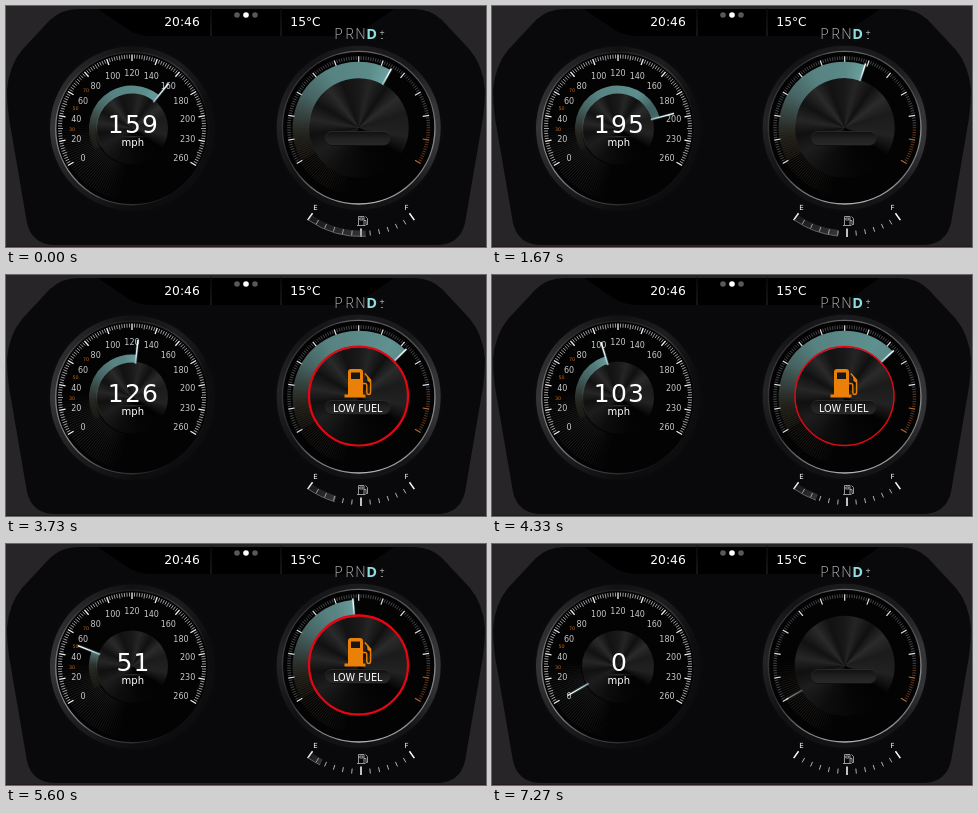
Write an HTML page with a canvas that moves like this. It is 480 by 241 pixels and loops after 7.34 s.

```html
<!DOCTYPE html>
<html lang="en">
<head>
<meta charset="utf-8">
<title>Instrument cluster</title>
<style>
html, body { margin: 0; width: 100%; height: 100%; overflow: hidden; background: #272527; }
canvas { display: block; width: 480px; height: 241px; }
</style>
</head>
<body>
<canvas id="stage"></canvas>
<script>
const W = 480, H = 241, LOOP = 7340, STEP = 200 / 3;
const SANS = '"DejaVu Sans", sans-serif';
const LIGHT = '"Open Sans", "Noto Sans", sans-serif';
const canvas = document.getElementById('stage');
const scale = window.devicePixelRatio || 1;
const base = document.createElement('canvas');
for (const c of [canvas, base]) { c.width = W * scale; c.height = H * scale; }
const screen2d = canvas.getContext('2d');
let g = base.getContext('2d');
g.scale(scale, scale);
screen2d.scale(scale, scale);

const speedo = { x: 126, y: 122.5 };
const tacho = { x: 352.7, y: 121.7 };
const fuel = { x: 355, y: 138 };

// [time in ms, value]
const speedKeys = [[0, 159], [1670, 195], [1950, 201], [2930, 160], [3730, 126],
  [4930, 80], [5600, 51], [6400, 18], [6850, 4], [7250, 0]];
const tachoKeys = [[0, 29], [1670, 18], [1950, 18], [2930, 30], [3730, 45],
  [4300, 47], [4930, 41], [5250, 22], [5600, -5], [6900, -112], [7200, -120]];
const fuelKeys = [[0, 3], [7270, -35]];

function valueAt(keys, t) {
  const i = keys.findIndex(k => k[0] > t);
  if (i < 0) return keys[keys.length - 1][1];
  const [t0, a] = keys[i - 1], [t1, b] = keys[i];
  return a + (b - a) * (t - t0) / (t1 - t0);
}

// Angles are in degrees, clockwise from straight up.
const rad = a => (a - 90) * Math.PI / 180;
const polar = (c, r, a) => [c.x + r * Math.cos(rad(a)), c.y + r * Math.sin(rad(a))];

function conic(c, from, stops) {
  const grad = g.createConicGradient(rad(from), c.x, c.y);
  stops.forEach(([deg, color]) => grad.addColorStop(deg / 360, color));
  return grad;
}
function linear(x0, y0, x1, y1, ...colors) {
  const grad = g.createLinearGradient(x0, y0, x1, y1);
  colors.forEach((color, i) => grad.addColorStop(i / (colors.length - 1), color));
  return grad;
}
function radial(c, r0, r1, ...colors) {
  const grad = g.createRadialGradient(c.x, c.y, r0, c.x, c.y, r1);
  colors.forEach((color, i) => grad.addColorStop(i / (colors.length - 1), color));
  return grad;
}
function disc(c, r, fill) {
  g.fillStyle = fill;
  g.beginPath();
  g.arc(c.x, c.y, r, 0, 2 * Math.PI);
  g.fill();
}
function arc(c, r, from, to, width, color) {
  g.strokeStyle = color;
  g.lineWidth = width;
  g.beginPath();
  g.arc(c.x, c.y, r, rad(from), rad(to));
  g.stroke();
}
function spoke(c, r0, r1, a, width, color) {
  g.strokeStyle = color;
  g.lineWidth = width;
  g.beginPath();
  g.moveTo(...polar(c, r0, a));
  g.lineTo(...polar(c, r1, a));
  g.stroke();
}
function text(str, x, y, size, color = '#fff', family = SANS, weight = 400) {
  g.font = `${weight} ${size}px ${family}`;
  g.textAlign = 'center';
  g.textBaseline = 'alphabetic';
  g.fillStyle = color;
  g.fillText(str, x, y);
}
function shape(d, fill, stroke, width = 1) {
  const path = new Path2D(d);
  if (fill) { g.fillStyle = fill; g.fill(path); }
  if (stroke) { g.strokeStyle = stroke; g.lineWidth = width; g.stroke(path); }
}

function drawPanel() {
  g.fillStyle = '#272527';
  g.fillRect(0, 0, W, H);
  shape('M72 3H408Q424 3 436 14L464 44Q477 60 479 84Q479 98 477 112L459 217Q454 239 430 239H50Q26 239 21 217L3 112Q1 98 1 84Q3 60 16 44L44 14Q56 3 72 3Z', '#09080b');
  g.fillStyle = '#25191d';
  g.fillRect(0, 240, W, 1);

  shape('M92 3L120 22Q131 30 146 30H334Q349 30 360 22L388 3Z', '#000');
  g.fillStyle = linear(0, 0, 0, 30, '#0c0c0e', '#2d2d30');
  g.fillRect(204.5, 2, 1, 28);
  g.fillRect(274.5, 2, 1, 28);
  [231, 240, 249].forEach(x => disc({ x, y: 9 }, 2.8, x === 240 ? '#fff' : '#58585a'));
  text('20:46', 176, 20, 12.3);
  text('15°C', 299.5, 20, 12.3);

  g.fontStretch = 'condensed';
  [...'PRN'].forEach((ch, i) => text(ch, 332.5 + i * 11, 33, 14.5, '#b2b5b7', LIGHT, 300));
  text('D', 365.5, 33, 14.5, '#8fdede', LIGHT, 700);
  g.fontStretch = 'normal';
  text('+', 376, 30, 9, '#c4c4c4', LIGHT);
  text('-', 376, 34.5, 9, '#c4c4c4', LIGHT);
}

function drawBezel(c, band, rim) {
  disc(c, 87, radial(c, 76, 87, 'rgba(22,22,24,.8)', 'rgba(9,8,11,0)'));
  arc(c, 79, 0, 360, 6, conic(c, 0, band));
  disc(c, 76, '#030304');
  arc(c, 76.3, 0, 360, 1.4, conic(c, 0, rim));
}

// Fine rays fading out below the start of the scale.
function drawRays(c, inner, outer, tint) {
  for (let a = -172; a <= -84; a += 2) {
    const alpha = .38 * Math.sin((a + 172) / 88 * Math.PI);
    spoke(c, inner, outer, a, .8, `rgba(${tint},${alpha})`);
  }
}

function drawHub(c, r) {
  disc(c, r, conic(c, 0, [[0, '#19191a'], [14, '#252526'], [34, '#101011'], [52, '#2b2b2c'], [72, '#1b1b1c'],
    [100, '#222223'], [118, '#0b0b0c'], [124, '#020203'], [165, '#050506'], [205, '#0d0d0e'], [240, '#1d1d1e'],
    [262, '#101011'], [280, '#262627'], [300, '#111112'], [322, '#2a2a2b'], [340, '#121213'], [360, '#19191a']]));
}

function drawDials() {
  drawBezel(speedo,
    [[0, '#111113'], [35, '#1d1d1f'], [70, '#0d0d0f'], [180, '#0d0d0f'], [225, '#1d1d1f'], [270, '#353537'], [310, '#29292b'], [360, '#111113']],
    [[0, '#1c1c1e'], [40, '#3c3c3e'], [75, '#111113'], [150, '#0f0f11'], [200, '#424244'], [235, '#87878a'], [285, '#6e6e70'], [320, '#303032'], [360, '#1c1c1e']]);
  drawRays(speedo, 37, 72, '92,90,86');
  for (let a = -120; a <= 120; a += 2) {
    const major = a % 20 === 0, mid = a % 10 === 0;
    spoke(speedo, major ? 67.5 : mid ? 69 : 70, 74, a, major ? 1.3 : .8, major ? '#f4f4f4' : '#c4c4c4');
  }
  const labels = [0, 20, 40, 60, 80, 100, 120, 140, 160, 180, 200, 230, 260];
  labels.forEach((n, i) => {
    const [x, y] = polar(speedo, 56.5, i * 20 - 120);
    text(n, x, y + 3.8, 8, '#c9c9c9');
  });
  [30, 50, 70].forEach(n => {
    const [x, y] = polar(speedo, 60, n - 120);
    text(n, x, y + 2, 4.8, '#c06a1a');
  });
  drawHub(speedo, 36);

  drawBezel(tacho,
    [[0, '#1b1b1d'], [40, '#19191b'], [75, '#343436'], [105, '#343436'], [140, '#151517'], [230, '#111113'], [275, '#242426'], [320, '#141416'], [360, '#1b1b1d']],
    [[0, '#69696b'], [30, '#58585a'], [60, '#4a4a4c'], [95, '#88888a'], [130, '#7c7c7e'], [170, '#bababc'], [205, '#868688'], [245, '#2b2b2d'], [285, '#3b3b3d'], [325, '#2e2e30'], [360, '#69696b']]);
  drawRays(tacho, 50, 68, '96,84,64');
  for (let a = -120; a <= 120; a += 2) {
    const major = a % 20 === 0, hot = a >= 90;
    spoke(tacho, major ? 65 : 68, 71.5, a, major ? 1.2 : .8,
      hot ? (major ? '#b56a35' : '#7a4322') : (major ? '#e4e4e4' : '#565a5c'));
  }
  drawHub(tacho, 50);
}

function drawFuelScale() {
  for (let i = -6; i <= 6; i++) {
    const long = i % 6 === 0;
    spoke(fuel, long ? 84.5 : 87, long ? 93 : 92, 180 - i * 35 / 6, long ? 1.5 : 1, long ? '#fff' : '#b0b0b0');
  }
  text('E', 309.5, 204, 7);
  text('F', 400.5, 204, 7);
  shape('M352.5 219.5V210.5H358V219.5M351 219.5H359.5M353.8 212H356.8V214H353.8ZM358 214.5H360V218.5H361.5V212.5L359.5 210.5', null, '#b9b9b9', .8);
}

function drawSweep(c, inner, outer, angle) {
  if (angle < -119.8) return;
  const mid = (inner + outer) / 2, width = outer - inner;
  const clear = 'rgba(70,62,43,0)';
  arc(c, mid, -120, angle, width, conic(c, -120, [[0, 'rgba(80,70,48,.12)'], [20, 'rgba(88,84,65,.3)'],
    [38, 'rgba(88,106,99,.55)'], [62, 'rgba(86,124,122,.8)'], [90, '#578281'], [150, '#5d908e'],
    [172, '#46696a'], [200, '#283b3c'], [240, '#243536'], [360, clear]]));
  const tail = Math.min(18, angle + 120);
  arc(c, mid, angle - tail, angle, width,
    conic(c, angle - tail, [[0, 'rgba(150,210,210,0)'], [tail, 'rgba(150,210,210,.25)'], [360, clear]]));
}

function drawNeedle(c, inner, outer, angle, alpha = 1) {
  g.globalAlpha = alpha;
  spoke(c, inner, outer, angle, 3, 'rgba(150,210,220,.22)');
  const [x0, y0] = polar(c, inner, angle), [x1, y1] = polar(c, outer, angle);
  spoke(c, inner, outer, angle, 1.4, linear(x0, y0, x1, y1, '#8fb2b8', '#e4f2f4', '#fff'));
  g.globalAlpha = 1;
}

function drawPill() {
  g.beginPath();
  g.roundRect(319, 125.5, 65.5, 14, 7);
  g.fillStyle = linear(0, 125, 0, 140, '#0f0f10', '#212122', '#2a2a2b');
  g.fill();
  g.strokeStyle = linear(0, 125, 0, 140, '#2f2f30', '#1a1a1b', '#0c0c0d');
  g.lineWidth = .8;
  g.stroke();
}

function drawWarning(t) {
  const pulse = (1 - Math.cos((t - 4900) / 480 * 2 * Math.PI)) / 2;
  arc({ x: 352.5, y: 121 }, 49.5, 0, 360, 1.1 + 1.2 * pulse, '#e40613');
  const orange = '#ea8008';
  shape('M342 119.5V97Q342 94 345 94H354Q357 94 357 97V119.5ZM338.5 119.5H359.5V122.5H338.5Z', orange);
  shape('M345 97.5H354V104H345Z', '#171718');
  shape('M357 108.5H359Q360.8 108.5 360.8 110.5V117Q360.8 119.5 362.6 119.5Q364.6 119.5 364.6 117V105L358.8 98.5', null, orange, 1.4);
  shape('M361 101L364.6 104.5V108L361.5 106Z', orange);
  text('LOW FUEL', 351.7, 136.7, 9.7);
}

function drawFuelLevel(angle) {
  const end = 180 - angle;
  if (end >= 215) return;
  arc(fuel, 89.5, end, 215, 6, conic(fuel, end, [[0, 'rgba(130,130,134,.36)'],
    [215 - end, 'rgba(85,85,88,.22)'], [360, 'rgba(85,85,88,.22)']]));
  arc(fuel, 92.5, end, 215, .8, '#77777a');
}

function render(ms) {
  let t = Math.floor((ms % LOOP + 4) / STEP) * STEP;
  if (t < 2 * STEP - 1) t = 0;
  const speed = valueAt(speedKeys, t);
  const speedAngle = speed <= 200 ? speed - 120 : 80 + (speed - 200) * 2 / 3;
  const tachoAngle = valueAt(tachoKeys, t);

  g.drawImage(base, 0, 0, W, H);
  drawFuelLevel(valueAt(fuelKeys, t));
  drawSweep(speedo, 35, 43, speedAngle);
  drawNeedle(speedo, 34, 58, speedAngle);
  g.letterSpacing = '1.2px';
  text(Math.round(speed), 127.5, 127, 25);
  g.letterSpacing = '0px';
  g.fillStyle = linear(105, 0, 149, 0, '#0000', '#5c5c5e', '#0000');
  g.fillRect(105, 130.5, 44, .7);
  text('mph', 126.8, 139.5, 10);

  drawSweep(tacho, 49.5, 66, tachoAngle);
  drawNeedle(tacho, 49, 67.5, tachoAngle, Math.min(1, .4 + (tachoAngle + 120) / 60));
  drawPill();
  if (t > 2130 && t < 6850) drawWarning(t);
}

drawPanel();
drawDials();
drawFuelScale();
g = screen2d;

const start = performance.now();
function tick() {
  render(performance.now() - start);
  requestAnimationFrame(tick);
}
render(0);
requestAnimationFrame(tick);
</script>
</body>
</html>
```
